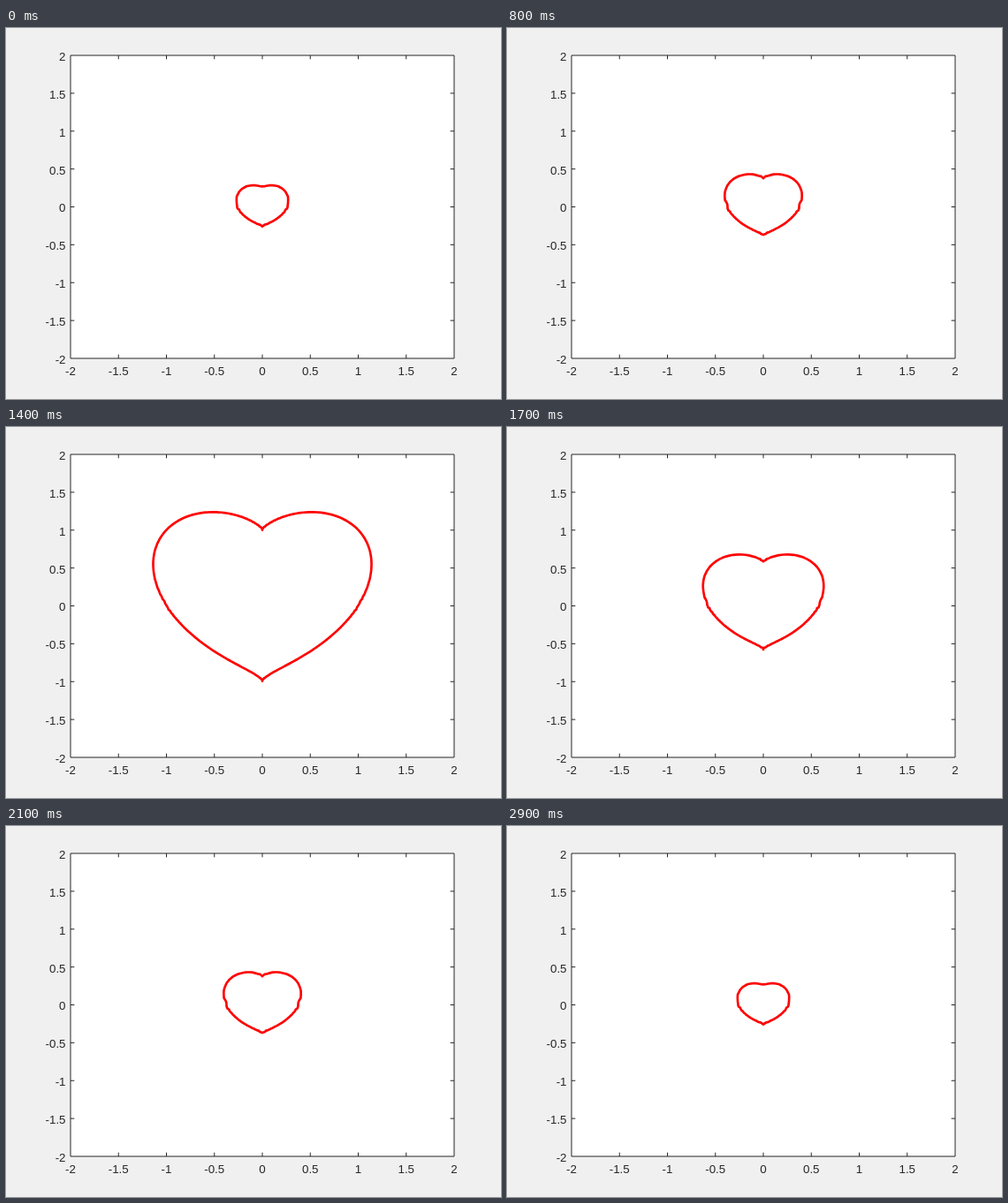
Animation of 560 by 420 pixels, one loop 3000 ms. Source, as an HTML page:

```html
<!DOCTYPE html>
<html lang="en">
<head>
<meta charset="utf-8">
<title>Beating heart plot</title>
<style>
  html, body { margin: 0; width: 100%; height: 100%; overflow: hidden; background: #f0f0f0; }
  svg { display: block; width: 560px; height: 420px; }
  text { font: 13.33px "Liberation Sans", Arial, sans-serif; fill: #262626; }
  #axes { fill: #fff; stroke: #262626; stroke-width: 1; }
  #heart { fill: none; stroke: #f00; stroke-width: 2.67; stroke-linecap: round; stroke-linejoin: round; }
</style>
</head>
<body>
<svg viewBox="0 0 560 420">
  <path id="axes"/>
  <g id="labels"></g>
  <path id="heart"/>
</svg>
<script>
const LEFT = 73, RIGHT = 507, TOP = 31, BOTTOM = 374, TICK = 4.34;
const CX = 290, CY = 202.1, SX = 108.5, SY = 85.575;
const GRID = 151, STEP_MS = 100, SIZES = 15;

function drawAxes() {
  const labels = document.getElementById('labels');
  let d = `M${LEFT} ${TOP}H${RIGHT}V${BOTTOM}H${LEFT}Z`;
  const addText = (value, x, y, anchor) => {
    const t = document.createElementNS('http://www.w3.org/2000/svg', 'text');
    t.setAttribute('x', x);
    t.setAttribute('y', y);
    t.setAttribute('text-anchor', anchor);
    t.textContent = value;
    labels.append(t);
  };
  for (let i = 0; i <= 8; i++) {
    const value = i / 2 - 2;
    const x = LEFT + i * (RIGHT - LEFT) / 8;
    const y = BOTTOM - i * (BOTTOM - TOP) / 8;
    if (i % 8) {
      d += `M${x} ${TOP}v${TICK}M${x} ${BOTTOM}v${-TICK}`;
      d += `M${LEFT} ${y}h${TICK}M${RIGHT} ${y}h${-TICK}`;
    }
    addText(value, x, 393, 'middle');
    addText(value, 67.5, Math.ceil(y - .5) + 5.5, 'end');
  }
  document.getElementById('axes').setAttribute('d', d);
}

const node = i => -2 + 4 * i / (GRID - 1);

function heartValue(x, y, n) {
  return (n * (x * x + y * y) - 1) ** 3 - n * n * x * x * y ** 3;
}

// Zero contour on a coarse grid; linear interpolation gives the small kinks.
function contour(n) {
  const f = [];
  for (let j = 0; j < GRID; j++) {
    f.push(Float64Array.from({ length: GRID }, (_, i) => heartValue(node(i), node(j), n)));
  }
  let d = '';
  for (let j = 0; j < GRID - 1; j++) {
    for (let i = 0; i < GRID - 1; i++) {
      const corners = [[i, j], [i + 1, j], [i + 1, j + 1], [i, j + 1]];
      const hits = [];
      for (let k = 0; k < 4; k++) {
        const [ai, aj] = corners[k], [bi, bj] = corners[(k + 1) % 4];
        const a = f[aj][ai], b = f[bj][bi];
        if (a < 0 === b < 0) continue;
        const t = a / (a - b);
        const x = CX + SX * node(ai + t * (bi - ai));
        const y = CY - SY * node(aj + t * (bj - aj));
        hits.push(x.toFixed(2) + ' ' + y.toFixed(2));
      }
      for (let k = 0; k + 1 < hits.length; k += 2) d += `M${hits[k]}L${hits[k + 1]}`;
    }
  }
  return d;
}

drawAxes();
const heart = document.getElementById('heart');
const paths = Array.from({ length: SIZES }, (_, i) => contour(i + 1));
const start = performance.now();
let shown = -1;

function frame() {
  const step = Math.floor((performance.now() - start) / STEP_MS) % (2 * SIZES);
  const index = step < SIZES ? SIZES - 1 - step : step - SIZES;
  if (index !== shown) heart.setAttribute('d', paths[shown = index]);
  requestAnimationFrame(frame);
}
frame();
</script>
</body>
</html>
```
